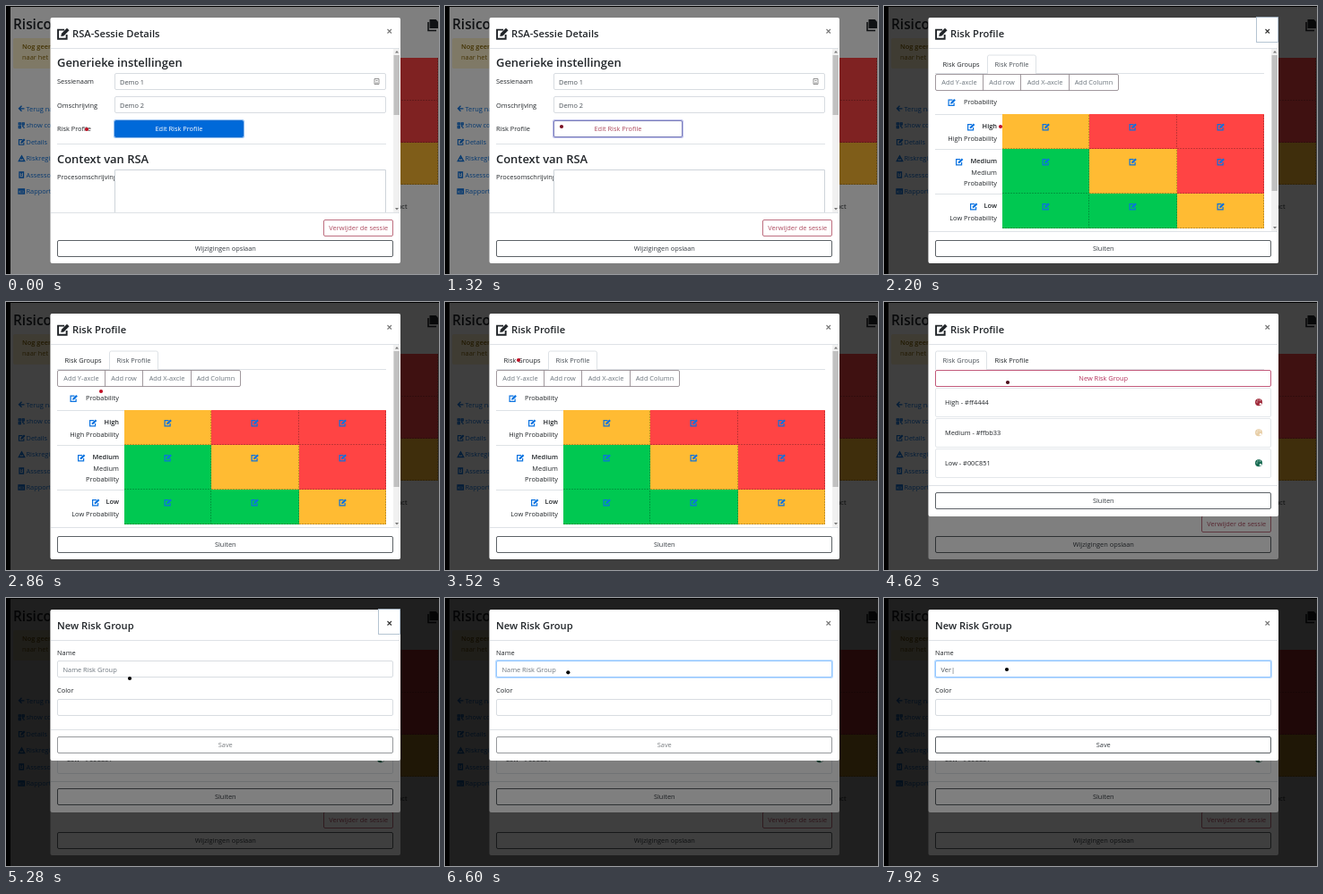
Write an HTML page that moves like this. It is 483 px wide and 300 px high and loops after 8 s.

```html
<!DOCTYPE html>
<html lang="nl">
<head>
<meta charset="utf-8">
<style>
html, body { margin: 0; width: 100%; height: 100%; overflow: hidden; background: #000 }
svg { display: block; width: 483px; height: 300px; font-family: "Open Sans", "Noto Sans", sans-serif }
</style>
</head>
<body>
<svg id="stage" viewBox="0 0 483 300"></svg>
<script>
const INK = '#212529', GREY = '#6c757d', BLUE = '#0a72e0', RED = '#ad4a5f', LINE = '#dee2e6';
const HIGH = '#ff4444', MID = '#ffbb33', LOW = '#00c851';

const text = (x, y, s, o = {}) =>
  `<text x="${x}" y="${y}" font-size="${o.size || 7.4}" font-weight="${o.bold ? 600 : 400}" fill="${o.fill || INK}" text-anchor="${o.anchor || 'start'}">${s}</text>`;
const rect = (x, y, x2, y2, fill = '#fff', stroke = 'none', r = 0) =>
  `<rect x="${x}" y="${y}" width="${x2 - x}" height="${y2 - y}" rx="${r}" fill="${fill}" stroke="${stroke}" stroke-width=".8"/>`;
const path = (d, fill = 'none', stroke = 'none', w = 1) =>
  `<path d="${d}" fill="${fill}" stroke="${stroke}" stroke-width="${w}"/>`;
const dashed = d =>
  `<path d="${d}" fill="none" stroke="#0006" stroke-width=".6" stroke-dasharray="2 1"/>`;
const group = (id, body) => `<g id="${id}">${body}</g>`;
const rule = (y, x = 50, x2 = 439) => path(`M${x} ${y}H${x2}`, 'none', LINE);
const title = (x, s) => text(x, 34.5, s, { size: 11.2, bold: 1 });
const heading = (y, s) => text(57, y, s, { size: 12.95, bold: 1 });
const field = (y, x = 121.5, x2 = 423.5, h = 18) => rect(x, y, x2, y + h, '#fff', '#ced4da', 1.5);
const button = (x, y, s, c = '#343a40') =>
  rect(x, y, 431.5, y + 18, '#fff', c, 1.5) + text((x + 432) / 2, y + 11.4, s, { fill: c, anchor: 'middle' });
const edit = (x, y, k = 1, c = BLUE) => `<g transform="translate(${x - 4 * k} ${y - 4 * k}) scale(${k})">` +
  path('M5 1.6H.6V7.9H6.6V5', 'none', c, 1.2) + path('M2.6 6.2L3 4.2 6.8.4 8.4 2 4.6 5.8Z', c) + '</g>';
const dialog = bottom => rect(49.5, 13, 440, bottom, '#fff', 'none', 2) + rule(47.5);
const cross = c => path('M425.5 26l4.5 4.5m0-4.5l-4.5 4.5', 'none', c, 1.1);
const focusedClose = id => group(id, rect(415.5, 12.5, 439.5, 40.5, '#fff', '#a3b6c8') + cross('#333'));
const scrollbar = (end, thumb) => rect(432, 48, 439, end, '#f1f1f1') + rect(432.5, 55, 439, thumb, '#c1c1c1') +
  path('M434 52.5h4l-2-2.5z', '#777') + path(`M434 ${end - 5}h4l-2 2.5z`, '#777');
const shade = rect(5, 1, 483, 300, '#00000080');

function page() {
  const items = ['Terug naar', 'show code', 'Details', 'Riskregister', 'Assessoren', 'Rapporten'];
  const icons = [
    'M7 3.3H1m3-3l-3 3 3 3', 'M.8.8h2v2h-2zM4.7.8h2v2h-2zM.8 4.7h2v2h-2zM4.5 4.5h1v1m1 0v1.5', '',
    'M4 .8L7.2 6.5H.8zM4 2.8v2', 'M1.5.5h4.5v6h-4.5zM3 2h1.5m-1.5 2h1.5', 'M.5 1h6.5v5h-6.5zM.5 2h6.5M2 4h4'];
  let s = rect(5, 1, 483, 300) + text(8, 26, 'Risico', { size: 15.4, bold: 1 }) +
    rect(8, 36, 80, 70, '#fff3cd', 'none', 2) +
    text(18, 48.3, 'Nog geen', { bold: 1, fill: '#856404' }) + text(18, 60, 'naar het', { fill: '#856404' });
  items.forEach((item, i) => {
    const y = 117.5 + i * 18.5;
    s += text(22.5, y, item, { fill: BLUE });
    s += i == 2 ? edit(17.5, y - 2.7, .9) :
      `<g transform="translate(13.5 ${y - 6})">${path(icons[i], 'none', BLUE, 1.3)}</g>`;
  });
  s += rect(420, 58, 482, 153, HIGH) + rect(420, 153, 482, 200, MID) +
    dashed('M420 105.5H481.5M420 152.5H481.5M420 199.5H481.5V58') +
    text(447.5, 227, 'Impact', { anchor: 'end' });
  return s + path('M472.5 15h7l2.5 2.5V25h-9.5z', INK) + path('M471 18v9.5h9', 'none', INK, 1.6);
}

function details() {
  const label = (y, s) => text(57, y, s);
  const profile = (id, ring, fill, border, ink) => group(id,
    rect(120, 127, 266, 148, ring, 'none', 2.5) + rect(121.5, 128.5, 264.5, 146.5, fill, border, 1.5) +
    text(193, 140, 'Edit Risk Profile', { fill: ink, anchor: 'middle' }));
  return dialog(288) + edit(63.5, 30.5, 1.6, INK) + title(74, 'RSA-Sessie Details') + cross('#777') +
    heading(68, 'Generieke instellingen') +
    label(87, 'Sessienaam') + field(75.5) + text(127, 87.7, 'Demo 1', { fill: '#495057' }) +
    path('M411 81.5h5v6h-5zM412.5 83.5h2m-2.5 2.5h3', 'none', '#777', .8) +
    label(113.5, 'Omschrijving') + field(101.5) + text(127, 113.8, 'Demo 2', { fill: '#495057' }) +
    label(140, 'Risk Profile') +
    profile('filled', '#8fbdf2', '#0069d9', '#0062cc', '#fff') +
    profile('hollow', '#b9bbe8', '#fff', '#6468ac', RED) +
    rule(154.5, 57, 424) + heading(176, 'Context van RSA') +
    label(194, 'Procesomschrijving') + path('M121.5 231V183.5H423.5V231', '#fff', '#ced4da') +
    scrollbar(231, 122) + rule(231.5) +
    button(354.5, 239.5, 'Verwijder de sessie', RED) +
    button(57.5, 262.5, 'Wijzigingen opslaan');
}

const tabs = active => rule(75.5, 57, 424) +
  path(active ? 'M115.5 76V57q0-2 2-2h50q2 0 2 2V76' : 'M57.5 76V57q0-2 2-2h53q2 0 2 2V76', '#fff', LINE) +
  text(65.5, 68, 'Risk Groups', { fill: active ? INK : '#495057' }) +
  text(123.5, 68, 'Risk Profile', { fill: active ? '#495057' : INK });

function matrix() {
  const right = (y, s, bold) => text(126, y, s, { anchor: 'end', bold });
  let s = dialog(288) + edit(63.5, 30.5, 1.6, INK) + title(74, 'Risk Profile') + cross('#777') +
    focusedClose('x1') + tabs(1) +
    rect(57.5, 76.5, 261.5, 94.5, '#fff', '#8a7f86', 1.5) +
    path('M110.5 76.5v18M152.5 76.5v18M206.5 76.5v18', 'none', '#8a7f86', .8);
  [[84, 'Add Y-axcle'], [131.5, 'Add row'], [179.5, 'Add X-axcle'], [234, 'Add Column']].forEach(([x, label]) =>
    s += text(x, 87.7, label, { fill: GREY, anchor: 'middle' }));
  s += edit(75.5, 107.5) + text(89, 109.7, 'Probability');
  const rows = [
    [121, 160, 97, 'High', [MID, HIGH, HIGH]],
    [160, 210, 84, 'Medium', [LOW, MID, HIGH]],
    [210, 249, 100, 'Low', [LOW, LOW, MID]]];
  for (const [y, y2, x, name, cells] of rows) {
    s += rule(y + .5, 57, 132) + edit(x, y + 14) + right(y + 15.7, name, 1);
    s += name == 'Medium' ? right(y + 29, name) + right(y + 41, 'Probability') : right(y + 30, name + ' Probability');
    cells.forEach((c, i) => {
      const left = Math.round(131.5 + i * 97.5), end = Math.round(229 + i * 97.5);
      s += rect(left, y, end, y2, c) + edit(left + 48.5, y + 14) + dashed(`M${left} ${y2 - .5}H${end - .5}V${y}`);
    });
  }
  return s + scrollbar(252, 207) + rule(252.5) + button(57.5, 262.5, 'Sluiten');
}

function groups() {
  let s = dialog(240) + edit(63.5, 30.5, 1.6, INK) + title(74, 'Risk Profile') + cross('#777') + tabs(0) +
    button(57.5, 76.5, 'New Risk Group', '#b3305a');
  [['High - #ff4444', '#a02c3c'], ['Medium - #ffbb33', '#e8cfa8'], ['Low - #00C851', '#176b52']].forEach(([name, c], i) => {
    const y = 96.5 + i * 34;
    s += rect(57.5, y, 431.5, y + 32, '#fff', LINE, 1.5) + text(68, y + 18.5, name) +
      `<circle cx="418" cy="${y + 15.7}" r="4" fill="${c}"/>` +
      path(`M415.5 ${y + 15.5}h1m0-2h1m1.5 0h1`, 'none', '#fff', 1) +
      `<circle cx="420" cy="${y + 17.8}" r="1.2" fill="#fff"/>`;
  });
  return s + rule(205.5) + button(57.5, 213.5, 'Sluiten');
}

function form() {
  return dialog(182) + title(57, 'New Risk Group') + cross('#777') + focusedClose('x3') +
    text(57, 64, 'Name') + field(70.5, 57.5, 431.5) +
    group('focus', rect(56, 69, 433, 90, '#bfdeff', 'none', 2.5) + rect(57.5, 70.5, 431.5, 88.5, '#fff', '#80bdff', 1.5)) +
    group('hint', text(63.5, 82.7, 'Name Risk Group', { fill: GREY })) +
    '<text id="typed" x="63.5" y="82.7" font-size="7.4" fill="#495057"></text>' +
    text(57, 106, 'Color') + field(113.5, 57.5, 431.5) + rule(147.5) +
    group('save', button(57.5, 155.5, 'Save'));
}

const $ = id => document.getElementById(id);
$('stage').innerHTML = page() + shade + details() +
  group('second', shade + group('matrix', matrix()) + group('groups', groups())) +
  group('third', shade + form()) + '<circle id="dot" r="2.1"/>';

const show = (id, on) => $(id).style.display = on ? '' : 'none';
// Each move: first step, last step, destination
const moves = [[440, 1320, 130, 135], [2420, 3520, 82, 65], [4180, 4620, 138, 90], [6380, 6820, 137, 80]];
const STEP = 220;

function pointer(t) {
  let x = 90, y = 138;
  for (const [a, b, toX, toY] of moves) {
    if (t < a) break;
    const k = Math.min(1, (Math.floor((t - a) / STEP) + 1) / ((b - a) / STEP + 1));
    x += (toX - x) * k;
    y += (toY - y) * k;
  }
  return [x, y];
}

function draw(t) {
  const hover = t >= 1100, typed = t < 7480 ? 0 : Math.min(3, Math.floor((t - 7480) / STEP) + 1);
  show('filled', !hover);
  show('hollow', hover);
  show('second', t >= 2200);
  show('matrix', t < 3740);
  show('groups', t >= 3740);
  show('third', t >= 5280);
  show('x1', t < 2420);
  show('x3', t < 6600);
  show('focus', t >= 6600);
  show('hint', !typed);
  $('typed').textContent = typed ? 'Ver'.slice(0, typed) + '|' : '';
  $('save').style.opacity = typed ? 1 : .65;
  const [x, y] = pointer(t), dot = $('dot');
  dot.setAttribute('cx', x);
  dot.setAttribute('cy', y);
  dot.setAttribute('fill', t >= 5280 ? '#000' : t >= 4620 ? '#4a0a18' : hover && t < 2200 ? '#7a0f22' : '#c01025');
}

function frame(now) {
  draw(now % 8000);
  requestAnimationFrame(frame);
}
requestAnimationFrame(frame);
</script>
</body>
</html>
```
